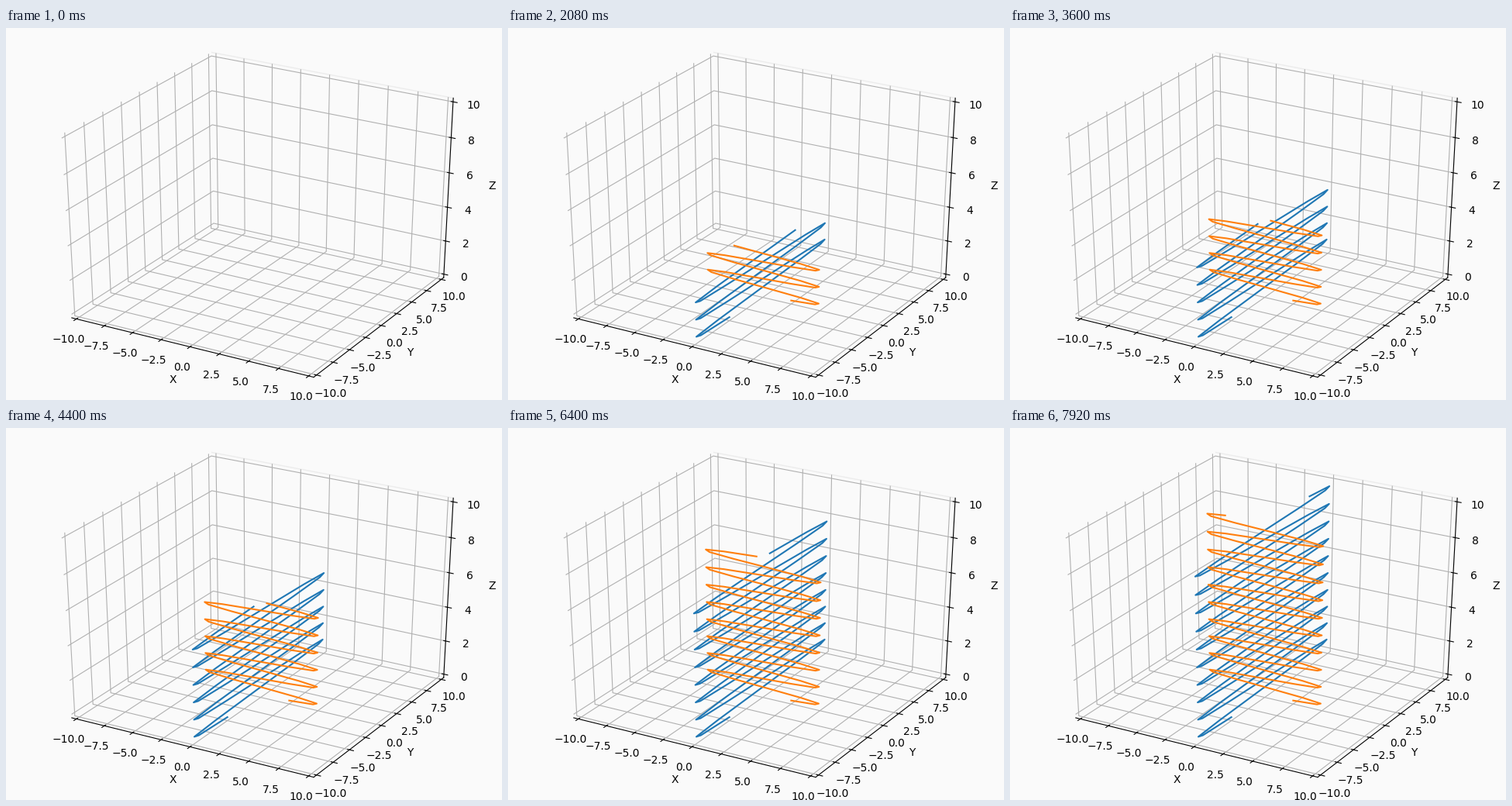
A matplotlib script for the animation above (8000 ms loop, 640 by 480 pixels).

```python
import math

import matplotlib.pyplot as plt
import numpy as np
from matplotlib.animation import FuncAnimation

FRAMES = 100
INTERVAL = 80
BACKGROUND = "#fafafa"
PANE_EDGE = "#ececec"


def make_axes(fig):
    """3D axes whose unit cube is stretched over the whole figure."""
    ax = fig.add_axes([0, 0, 1, 1], projection="3d", facecolor=BACKGROUND)
    ax.apply_aspect = lambda position=None: None
    ax.set_box_aspect((1, 1, 1), zoom=math.sqrt(3) / 1.8294640721620434)
    ax.view_init(elev=30, azim=-60)

    margin = 1 / 48
    ax.set_xlim(-10, 10, view_margin=margin)
    ax.set_ylim(-10, 10, view_margin=margin)
    ax.set_zlim(0, 10, view_margin=margin)
    ax.set_xticks(np.arange(-10, 10.1, 2.5))
    ax.set_yticks(np.arange(-10, 10.1, 2.5))
    ax.set_zticks(np.arange(0, 11, 2))
    ax.set(xlabel="X", ylabel="Y", zlabel="Z")

    for axis in (ax.xaxis, ax.yaxis, ax.zaxis):
        axis.set_pane_color(BACKGROUND)
    ax.yaxis.pane.set_edgecolor(PANE_EDGE)
    return ax


fig = plt.figure(figsize=(6.4, 4.8), dpi=100, facecolor=BACKGROUND)
ax = make_axes(fig)

# Two perpendicular waves climbing the z axis, ten samples per turn
z = np.arange(FRAMES) * 0.1
wave = np.sin(2 * np.pi * z + np.pi / 6)
still = np.zeros(FRAMES)
paths = [(still, -10 * wave, z), (5 * wave, still, z)]
lines = [ax.plot([], [], [], color=color, lw=1.5)[0] for color in ("C0", "C1")]


def update(frame):
    for line, path in zip(lines, paths):
        line.set_data_3d(*(values[:frame] for values in path))
    return lines


anim = FuncAnimation(fig, update, frames=FRAMES, interval=INTERVAL,
                     repeat=True, repeat_delay=0)
plt.show()
```
